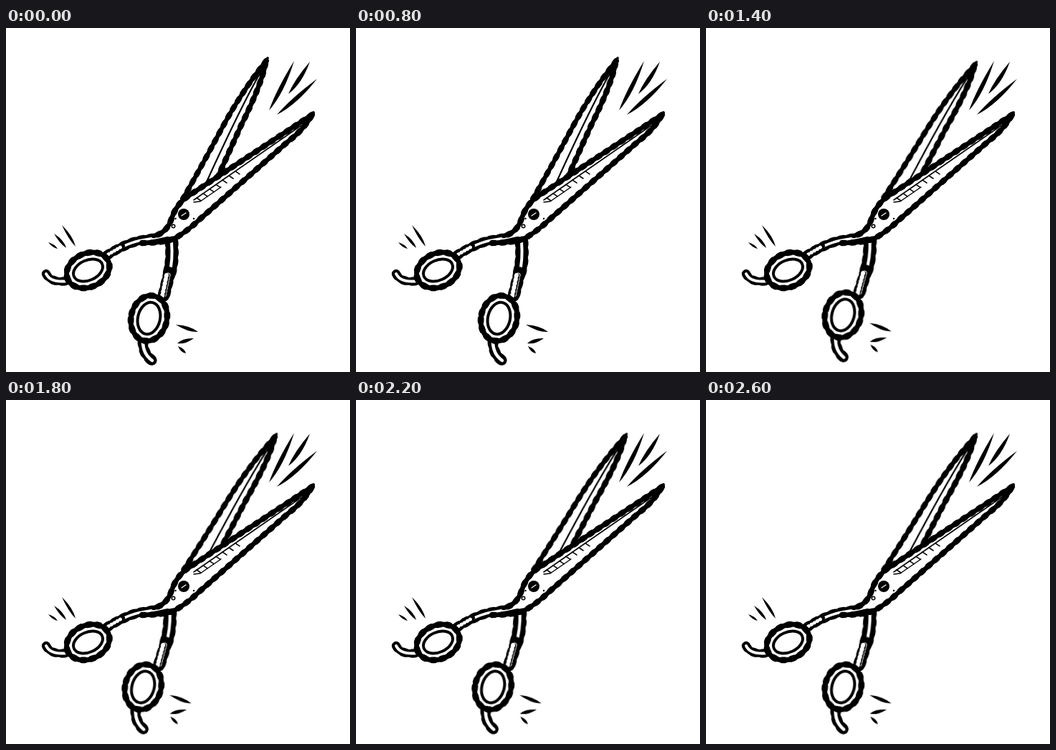
Animation, 480 px wide and 480 px high, one loop 2800 ms. Source, as an HTML page:

```html
<!DOCTYPE html>
<html lang="en">
<head>
<meta charset="utf-8">
<title>Scissors</title>
<style>
  html, body { margin: 0; width: 100%; height: 100%; overflow: hidden; background: #fff; }
  svg { display: block; width: 480px; height: 480px; }
  path { fill: none; stroke-linecap: round; stroke-linejoin: round; }
  #moving {
    transform-origin: 248px 260px;
    animation: snip 400ms steps(1, end) infinite;
  }
  @keyframes snip {
    0%, 100% { transform: none; }
    50% { transform: translateY(-1.5px) rotate(3.3deg); }
  }
</style>
</head>
<body>
<svg viewBox="0 0 480 480">
  <g id="moving"></g>
  <g id="fixed"></g>
</svg>
<script>
const INK = "#000", PAPER = "#fff";
let layer;

function path(d, style, transform = "") {
  const el = document.createElementNS("http://www.w3.org/2000/svg", "path");
  el.setAttribute("d", d);
  el.setAttribute("transform", transform);
  Object.assign(el.style, style);
  layer.append(el);
}

const fill = (d, color = INK) => path(d, { fill: color });

const line = (d, width, color = INK, dash = "none", transform) =>
  path(d, { stroke: color, strokeWidth: width, strokeDasharray: dash }, transform);

// Wider dashes over a solid stroke make the bumpy brush edge.
function brush(d, width, transform) {
  line(d, width, INK, "none", transform);
  line(d, width + 1.8, INK, "4 9", transform);
}

// Thick ink with a thin light core.
function tube(d, width, core) {
  brush(d, width);
  line(d, core, PAPER);
}

function dot(x, y, r, color = INK) {
  line(`M${x} ${y}h.01`, r * 2, color);
}

function ring(x, y, rx, ry, turn) {
  const oval = (a, b) => `M${-a} 0A${a} ${b} 0 1 1 ${a} 0A${a} ${b} 0 1 1 ${-a} 0Z`;
  const place = `translate(${x} ${y}) rotate(${turn})`;
  path(oval(rx, ry), { fill: PAPER }, place);
  brush(oval(rx, ry), 7, place);
  line(oval(rx - 9.5, ry - 9.5), 4, INK, "none", place);
}

// Tapered mark between two points, bent sideways and fullest past its middle.
function mark(x1, y1, x2, y2, width, bend = 0) {
  const dx = x2 - x1, dy = y2 - y1, len = Math.hypot(dx, dy);
  const side = k => `${x1 + dx * .6 - dy / len * k} ${y1 + dy * .6 + dx / len * k}`;
  fill(`M${x1} ${y1}Q${side(bend + width)} ${x2} ${y2}Q${side(bend - width)} ${x1} ${y1}Z`);
}

// Rear blade, lower handle and its accent marks
layer = document.getElementById("moving");
fill("M363 46Q320 105 246 239L286 226 328 136Z", PAPER);
brush("M363 46Q329 88 299 144T247 238", 6);
brush("M362 50Q356 80 328 136L291 218", 6.5);
line("M355 62Q325 115 272 232", 2.2);
line("M365 42L361 54", 3.6);

tube("M231 298Q233 325 228 342", 17, 4);
brush("M228 342L220 374", 15.5);
line("M226 345L220 374", 7, PAPER, "0.1 4.5");
line("M226 345L220 374", 5, INK);
line("M225 345L219 374", 6, PAPER, "1.2 4.4", "translate(-1 0)");
tube("M191 437Q191 455 204 464", 13, 4.5);
ring(199.5, 405, 25, 32, 13);

mark(237, 414, 268, 424, 5);
mark(262, 433, 239, 440, 5);
mark(240, 444, 251, 454, 4);

// Front blade, upper handle and the still accent marks
layer = document.getElementById("fixed");
tube("M230 288Q210 293 190 296T141 317", 12, 3.5);
line("M139 318L163 304", 6, INK);
line("M139 318L163 304", 5, PAPER, "0.1 4.6");

fill("M428 120L255 233Q236 245 229 268L214 288 238 294 268 270 395 159Z", PAPER);
brush("M427 121L255 234Q238 245 231 266T206 290", 6.5);
brush("M426 123Q415 142 394 158L268 269Q252 284 238 292T190 300", 6.5);
line("M429 118L425 126", 4);
line("M412 136L262 240", 1.6);
line("M262 243L271 242 300 222", 1.4);
for (let i = 0; i < 7; i++) {
  const x = 266 + i * 9, y = 237 - i * 6.2;
  line(`M${x} ${y}l6 4`, 1.6);
}

dot(248, 260, 8);
line("M245 262l6-4", 1.2, PAPER);
dot(233.5, 276.5, 3);
dot(233.5, 276.5, 1.5, PAPER);
dot(236.5, 266, 1.2);
dot(262, 266, 1.2);

tube("M56 343Q62 356 86 353", 10.5, 4);
ring(114.5, 338, 31, 23.5, -24);

mark(402, 46, 367, 115, 6, -2);
mark(424, 47, 394, 92, 6, -2);
mark(434, 71, 378, 121, 6, -2);
mark(78, 275, 97, 305, 4, -1);
mark(67, 287, 84, 307, 4, -1);
mark(59, 299, 72, 308, 3);
</script>
</body>
</html>
```
